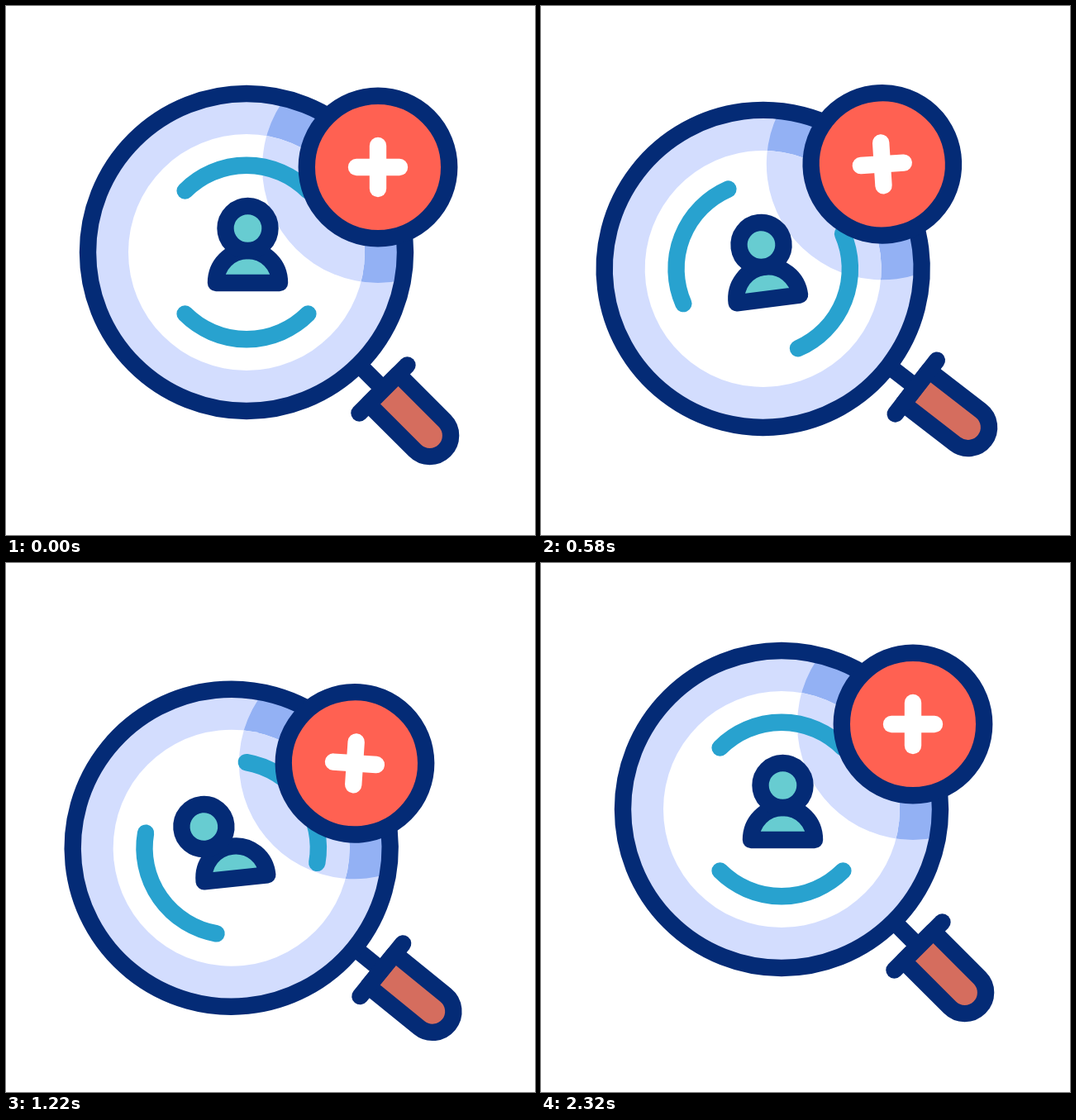
Animation, 640 px wide and 640 px high, one loop 2400 ms. Source, as an HTML page with a canvas:

```html
<!DOCTYPE html>
<html>
<head>
<meta charset="utf-8">
<title>Search for people</title>
<style>
html, body { margin: 0; width: 100%; height: 100%; overflow: hidden; background: #fff; }
canvas { display: block; width: 640px; height: 640px; }
</style>
</head>
<body>
<canvas id="stage" width="640" height="640"></canvas>
<script>
const ctx = document.getElementById('stage').getContext('2d');
const LOOP = 2400, TAU = Math.PI * 2, DEG = Math.PI / 180;
const LINE = 20.4;
const NAVY = '#042b76', PALE = '#d3ddfe', SHADE = '#93b1f4', RED = '#ff6152';
const TEAL = '#67ccd1', BLUE = '#28a2cf', BROWN = '#d56d5e', WHITE = '#fff';
const PIVOT = { x: 479, y: 486 }, LENS = { x: 291, y: 298 };

const smooth = u => {
  u = Math.min(1, Math.max(0, u));
  return u * u * (3 - 2 * u);
};

// Monotone cubic through [time, value] keys; flat at every extreme.
function track(keys) {
  const slope = i => (keys[i + 1][1] - keys[i][1]) / (keys[i + 1][0] - keys[i][0]);
  const tangents = keys.map((_, i) => {
    if (i === 0 || i === keys.length - 1) return 0;
    const a = slope(i - 1), b = slope(i);
    return a * b > 0 ? 2 * a * b / (a + b) : 0;
  });
  return t => {
    const last = keys.length - 1;
    if (t >= keys[last][0]) return keys[last][1];
    const i = keys.findIndex(k => k[0] > t) - 1;
    const [t0, v0] = keys[i], [t1, v1] = keys[i + 1];
    const d = t1 - t0, u = (t - t0) / d;
    return v0 + (v1 - v0) * smooth(u)
      + d * u * (1 - u) * (tangents[i] * (1 - u) - tangents[i + 1] * u);
  };
}

const tilt = track([[0, 0], [390, -18.2], [540, -10.4], [740, 7.3], [870, 15.8], [1000, 10],
  [1080, 4.2], [1290, -8], [1440, -4.2], [1690, 4.1], [1800, 3], [2160, 0]]);
const lift = track([[0, 0], [370, 50], [720, -35], [1060, 54], [1450, -20.4], [1810, 15], [2160, 0]]);
const badgeLift = track([[0, 0], [380, 51], [720, -36], [1060, 38], [1450, -20.2], [1810, 16], [2160, 0]]);
const plusTurn = track([[0, 0], [400, 41], [740, 150.6], [1000, 225], [1440, 322], [1800, 359], [1900, 360]]);
const headShift = track([[0, 0], [860, 0], [1220, -32], [1810, 31.6], [2320, 0]]);
const arcTurn = t => 720 * smooth((t - 30) / 2140);

function paint(fill, stroke) {
  if (fill) { ctx.fillStyle = fill; ctx.fill(); }
  if (stroke) { ctx.strokeStyle = stroke; ctx.stroke(); }
}

function circle(x, y, r, fill, stroke) {
  ctx.beginPath();
  ctx.arc(x, y, r, 0, TAU);
  paint(fill, stroke);
}

function line(x1, y1, x2, y2, color) {
  ctx.beginPath();
  ctx.moveTo(x1, y1);
  ctx.lineTo(x2, y2);
  paint(null, color);
}

function group(x, y, degrees, draw) {
  ctx.save();
  ctx.translate(x, y);
  ctx.rotate(degrees * DEG);
  draw();
  ctx.restore();
}

function drawHandle() {
  line(192, 0, 234, 0, NAVY);
  ctx.beginPath();
  ctx.moveTo(234, -25.4);
  ctx.lineTo(313.5, -25.4);
  ctx.arc(313.5, 0, 25.4, -Math.PI / 2, Math.PI / 2);
  ctx.lineTo(234, 25.4);
  ctx.closePath();
  paint(BROWN, NAVY);
  line(234, -41, 234, 41, NAVY);
}

function drawGlass(badgeX, badgeY) {
  circle(0, 0, 192, PALE);
  ctx.save();
  ctx.clip();
  circle(badgeX, badgeY, 140, SHADE);
  circle(0, 0, 143, WHITE);
  ctx.clip();
  circle(badgeX, badgeY, 140, PALE);
  ctx.restore();
}

function drawArcs() {
  for (const start of [-135, 45]) {
    ctx.beginPath();
    ctx.arc(0, 0, 105.2, start * DEG, (start + 90) * DEG);
    paint(null, BLUE);
  }
}

function drawPerson(shift) {
  ctx.beginPath();
  ctx.moveTo(-37, 37);
  ctx.bezierCurveTo(-37, 15, -20, -2, 1.5, -2);
  ctx.bezierCurveTo(23, -2, 40, 15, 40, 37);
  ctx.closePath();
  paint(TEAL, NAVY);
  circle(1.5 + shift, -29, 27, TEAL, NAVY);
}

function drawPlus() {
  line(-26, 0, 26, 0, WHITE);
  line(0, -26, 0, 26, WHITE);
}

function render(t) {
  const badgeX = 159, badgeY = -103 + badgeLift(t);
  ctx.clearRect(0, 0, 640, 640);
  ctx.lineWidth = LINE;
  ctx.lineCap = ctx.lineJoin = 'round';
  group(PIVOT.x, PIVOT.y + lift(t), tilt(t), () => {
    ctx.translate(LENS.x - PIVOT.x, LENS.y - PIVOT.y);
    group(0, 0, 45, drawHandle);
    drawGlass(badgeX, badgeY);
    group(0, 0, arcTurn(t), drawArcs);
    drawPerson(headShift(t));
    circle(0, 0, 192, null, NAVY);
    circle(badgeX, badgeY, 86.2, RED, NAVY);
    group(badgeX, badgeY, plusTurn(t), drawPlus);
  });
}

const begin = performance.now();
function tick() {
  render((performance.now() - begin) % LOOP);
  requestAnimationFrame(tick);
}
tick();
</script>
</body>
</html>
```
